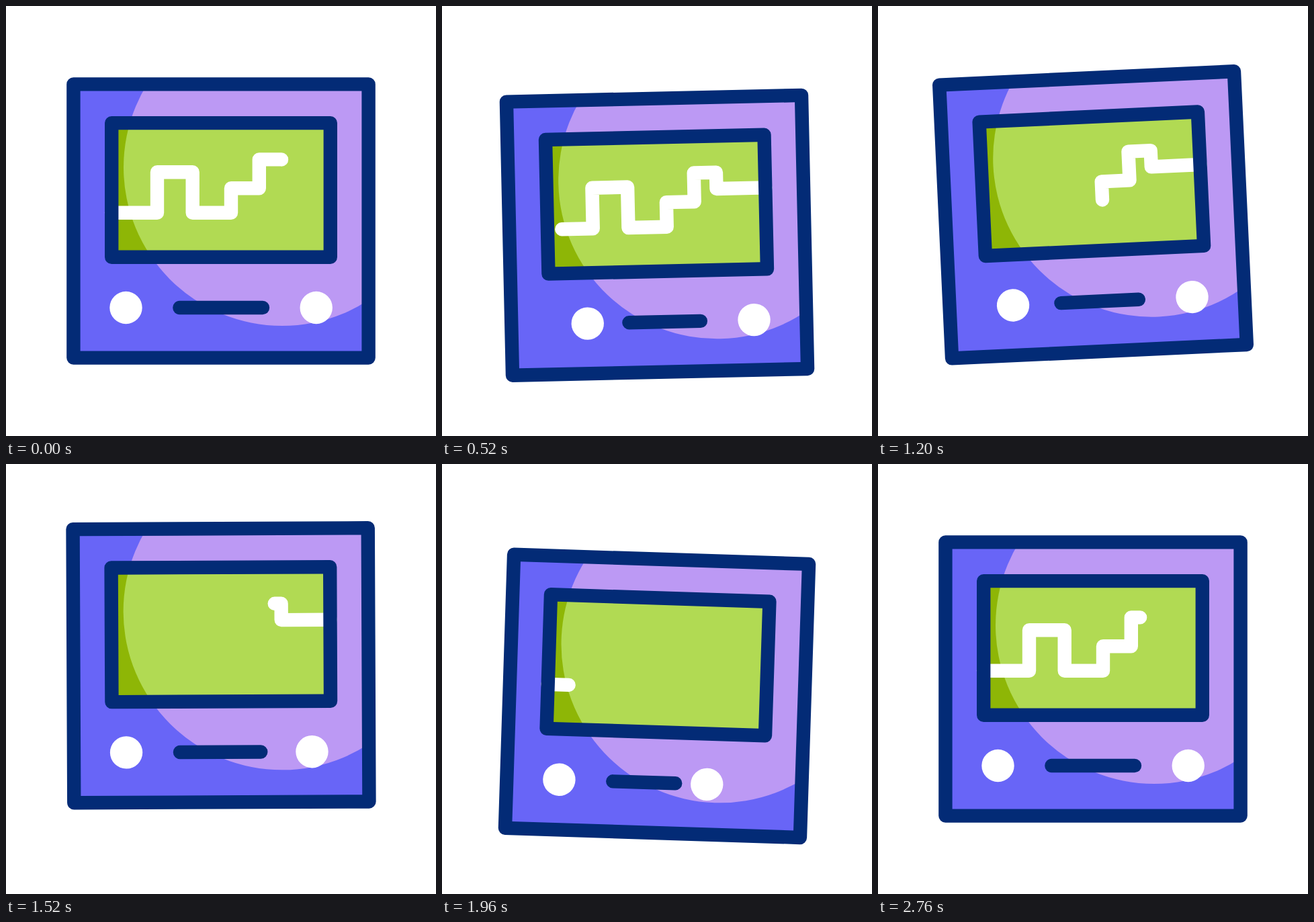
An HTML page that plays this animation: 640 by 640 pixels, repeating every 2800 ms.

```html
<!DOCTYPE html>
<html lang="en">
<head>
<meta charset="utf-8">
<title>Signal monitor</title>
<style>
  html, body { margin: 0; width: 100%; height: 100%; overflow: hidden; background: #fff; }
  svg { display: block; width: 100%; height: 100%; }
  .ink { fill: none; stroke: #032b76; stroke-width: 20.4; stroke-linecap: round; stroke-linejoin: round; }
  #trace { fill: none; stroke: #fff; stroke-width: 20.4; stroke-linecap: round; stroke-linejoin: round; }
</style>
</head>
<body>
<svg viewBox="0 0 640 640">
  <defs>
    <rect id="body" x="100.4" y="116.4" width="439.2" height="407.2"/>
    <rect id="screen" x="157.2" y="174.1" width="325.6" height="199.6"/>
    <circle id="glow" cx="411" cy="240" r="236"/>
    <clipPath id="inBody"><use href="#body"/></clipPath>
    <clipPath id="inScreen"><use href="#screen"/></clipPath>
  </defs>
  <g id="device">
    <use href="#body" fill="#6865f7"/>
    <use href="#glow" fill="#bc99f4" clip-path="url(#inBody)"/>
    <use href="#screen" fill="#8eb606"/>
    <use href="#glow" fill="#b1da53" clip-path="url(#inScreen)"/>
    <path id="trace" d="M157 307.8H225V247.3H277.7V307.8H335V271.2H376.8V228.4H410V252.7H483"/>
    <use href="#screen" class="ink"/>
    <use href="#body" class="ink"/>
    <path id="slot" class="ink"/>
    <circle id="left" cy="449" r="24.2" fill="#fff"/>
    <circle id="right" cy="449" r="24.2" fill="#fff"/>
  </g>
</svg>
<script>
const LOOP = 2800;
const [device, trace, slot, left, right] =
  ['device', 'trace', 'slot', 'left', 'right'].map(id => document.getElementById(id));
const length = trace.getTotalLength();

// [time, value] knots
const bob = [[200, 0], [800, 38.5], [1400, -25.7], [2000, 26], [2600, 0]];
const tilt = [[200, 0], [520, -1.27], [840, -3.53], [980, -4], [1200, -2.66],
  [1520, -0.25], [1850, 2.05], [1960, 1.85], [2240, 1], [2600, 0]];
const leftSlide = [[200, 0], [800, 1], [1400, 0]];
const rightSlide = [[1400, 0], [2000, 1], [2600, 0]];

const clamp = x => Math.min(1, Math.max(0, x));
const ramp = (t, from, to) => clamp((t - from) / (to - from));

// Cubic through the knots, flat at both ends and at every peak
function curve(knots, t) {
  const secant = i => (knots[i + 1][1] - knots[i][1]) / (knots[i + 1][0] - knots[i][0]);
  const slope = i => {
    if (i === 0 || i === knots.length - 1) return 0;
    const a = secant(i - 1), b = secant(i);
    return a * b > 0 ? (a + b) / 2 : 0;
  };
  let i = 0;
  while (i < knots.length - 2 && t > knots[i + 1][0]) i++;
  const [t0, v0] = knots[i], [t1, v1] = knots[i + 1];
  const p = ramp(t, t0, t1), q = 1 - p;
  return v0 + (v1 - v0) * p * p * (3 - 2 * p)
    + (t1 - t0) * p * q * (slope(i) * q - slope(i + 1) * p);
}

function drawTrace(t) {
  const wrapped = t < 200 ? t + LOOP : t;
  const writing = wrapped >= 1899;
  const from = writing ? 0 : length * ramp(t, 470, 1775);
  const to = writing ? length * ramp(wrapped, 1899, 2994) : length;
  trace.style.visibility = to - from > 0.01 ? 'visible' : 'hidden';
  trace.setAttribute('stroke-dasharray', `${to - from} ${length * 2}`);
  trace.setAttribute('stroke-dashoffset', -from);
}

function draw(t) {
  const a = curve(leftSlide, t), b = curve(rightSlide, t);
  device.setAttribute('transform',
    `translate(0 ${curve(bob, t)}) rotate(${curve(tilt, t)} 320 320)`);
  left.setAttribute('cx', 178.5 + 64 * a);
  right.setAttribute('cx', 461.7 - 64 * b);
  slot.setAttribute('d', `M${258.4 + 31 * a} 449H${382 - 31 * b}`);
  drawTrace(t);
}

const start = performance.now();
function tick() {
  draw((performance.now() - start) % LOOP);
  requestAnimationFrame(tick);
}
tick();
</script>
</body>
</html>
```
